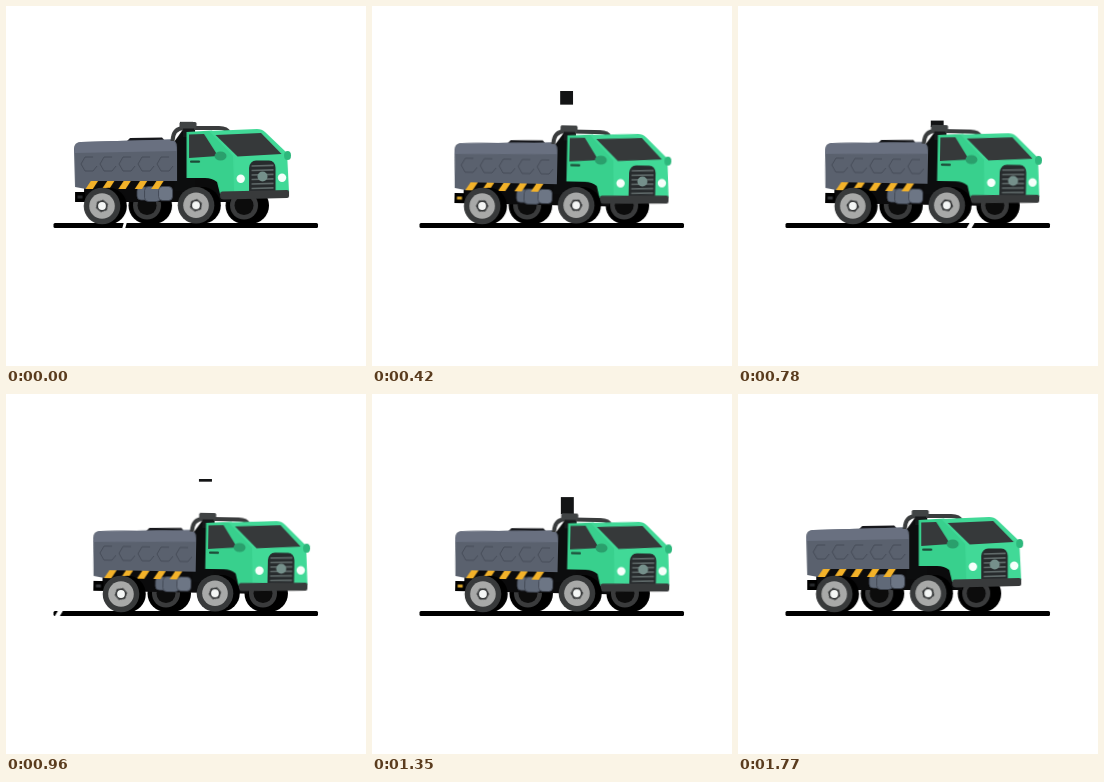
Animation, 360 px wide and 360 px high, one loop 1800 ms. Source, as an HTML page:

```html
<!DOCTYPE html>
<html lang="en">
<head>
<meta charset="utf-8">
<title>Tank truck</title>
<style>
  html, body { margin: 0; width: 100%; height: 100%; overflow: hidden; background: #fff; }
  svg { display: block; width: 100vw; height: 100vh; }

  .truck { animation: drive 900ms cubic-bezier(.31, .07, .25, 1) infinite alternate; }
  .body { transform-origin: 162px 160px; animation: pitch 900ms linear infinite alternate; }
  .hub { transform-box: fill-box; transform-origin: center; animation: spin 600ms linear infinite; }
  .puff { animation: rise calc(1800ms / 7) linear infinite; }
  .gap { animation: pass 1800ms linear infinite; }
  .gap.early { animation-name: leave; }
  .glint { animation: shine 1800ms linear infinite; }
  .lamp { animation: blink 1800ms step-end infinite; }

  @keyframes drive { to { transform: translateX(19px); } }
  @keyframes pitch {
    0%, 3.3% { transform: none; }
    16.7% { transform: translateY(6.5px) rotate(.33deg); }
    26.7% { transform: translateY(6px) rotate(.65deg); }
    46.7% { transform: translateY(3px) rotate(1.25deg); }
    100% { transform: translateY(2.5px) rotate(1deg); }
  }
  @keyframes spin { to { transform: rotate(360deg); } }
  @keyframes rise {
    0% { transform: translateY(116px); }
    6.6% { transform: translateY(113.5px); }
    43.6% { transform: translateY(93px); }
    58.3% { transform: translateY(86px); }
    63.4% { transform: translateY(82px); }
    78%, 100% { transform: translateY(66px); }
  }
  @keyframes pass {
    0% { transform: translateX(320px); }
    17.8%, 100% { transform: translateX(0); }
  }
  @keyframes leave {
    0% { transform: translateX(119px); }
    6.6%, 100% { transform: translateX(0); }
  }
  @keyframes shine {
    0%, 60% { transform: translateX(-30px); }
    63.3% { transform: none; }
    71%, 100% { transform: translateX(75px); }
  }
  @keyframes blink {
    0% { fill: #26282b; }
    5% { fill: #e0402c; }
    17% { fill: #d9a52a; }
    33% { fill: #34363a; }
    60% { fill: #6b4a22; }
    72% { fill: #d9a52a; }
    93% { fill: #26282b; }
  }
</style>
</head>
<body>
<svg viewBox="0 0 360 360">
  <defs>
    <clipPath id="air"><rect x="160" y="85.500" width="50" height="35"/></clipPath>
    <clipPath id="glass"><path d="M209.500 129L255 127L275.500 148L231.500 150.500Z"/></clipPath>
    <g id="far">
      <circle cx="6.500" r="18.500"/>
      <circle r="18.500"/>
      <circle r="14" fill="#3a3b3c"/>
      <circle r="9.500" fill="#0c0c0c"/>
    </g>
    <g id="near">
      <circle cx="6.500" r="18.300"/>
      <circle r="18.300" fill="#383a3b"/>
      <circle r="12.800" fill="#a8a9a8"/>
      <path class="hub" d="M-6.500 0L-3.200 -5.600H3.200L6.500 0L3.200 5.600H-3.200Z" fill="#383a3b"/>
      <circle r="3.900" fill="#f4f6f5"/>
    </g>
    <path id="stripe" d="M79.500 183L84.800 175H92L86.800 183Z" fill="#f3b229"/>
    <path id="plate" d="M4 -7H-4L-8 0L-4 7H4L8 2" fill="none" stroke="#474d59"/>
    <path id="bar" d="M245.500 0L267.500 -.6" stroke="#5f6969" stroke-width="1.600"/>
  </defs>

  <rect x="47.500" y="217" width="264.500" height="5" rx="1.500"/>
  <g fill="#fff">
    <path class="gap early" d="M-2 223L0 216H3L1 223Z"/>
    <path class="gap" style="animation-delay:-1107ms" d="M-4 223L0 216H5L1 223Z"/>
    <path class="gap" style="animation-delay:-745ms" d="M-11 223L-7 216H10L7 223Z"/>
  </g>

  <g class="truck">
    <g clip-path="url(#air)"><rect class="puff" x="174" width="13" height="17" fill="#131415"/></g>

    <use href="#far" x="141" y="199.500"/>
    <use href="#far" x="238" y="199.500"/>

    <g class="body">
      <!-- chassis and wheel arch -->
      <path d="M78 174H181V171H206L224 180V196H78Z" fill="#0b0b0c"/>
      <rect x="69" y="186" width="10" height="10"/>
      <rect class="lamp" x="71.500" y="189.500" width="5" height="3"/>
      <g fill="#606978" stroke="#3d434e" stroke-width=".8">
        <rect x="131" y="181" width="13" height="13" rx="4"/>
        <rect x="138.500" y="180.500" width="16" height="15" rx="4"/>
        <rect x="152.500" y="180.500" width="14" height="14" rx="4" fill="#6d7685"/>
      </g>

      <!-- tank -->
      <path d="M120 136L124 132L156 131.500L159 135Z" fill="#17181c"/>
      <path d="M168 136L178 122H189V185H168Z" fill="#0c0d0e"/>
      <path d="M68 143Q68 136 75 136L165 133.500Q171 134 171 141V175L90 175L80 183L69 181Z" fill="#5a616e"/>
      <path d="M68 147Q68 136 75 136L165 133.500Q170 134 170.500 145Z" fill="#697080"/>
      <use href="#plate" x="83" y="158"/>
      <use href="#plate" x="102" y="158"/>
      <use href="#plate" x="121" y="158"/>
      <use href="#plate" x="140" y="158"/>
      <use href="#plate" x="159" y="158"/>
      <use href="#stripe"/>
      <use href="#stripe" x="16.400"/>
      <use href="#stripe" x="32.800"/>
      <use href="#stripe" x="49.200"/>
      <use href="#stripe" x="65.600"/>

      <!-- exhaust -->
      <path d="M166.500 135Q167 122 178 122H213Q221 122 223 127" fill="none" stroke="#3a3c3d" stroke-width="4"/>
      <rect x="177" y="121" width="11" height="10" fill="#17181a"/>
      <rect x="173.500" y="116" width="17" height="6.500" rx="1.500" fill="#404344"/>

      <!-- cab -->
      <path d="M180.500 126L206 124.500L231 150V188H214L211 176Q206 172 199 172H180.500Z" fill="#38d08d"/>
      <path d="M203 125L251 123Q256 123 259 126L281 147L283 186L228 188L227 150Z" fill="#41d997"/>
      <path d="M183 128.500L198 128L212 150L183 152Z" fill="#36393a"/>
      <path d="M209.500 129L255 127L275.500 148L231.500 150.500Z" fill="#36393a"/>
      <g clip-path="url(#glass)"><path class="glint" d="M204 126H223.500L232 151H212Z" fill="#fff"/></g>
      <rect x="184" y="154.500" width="10" height="2.200" rx="1" fill="#1d4b38"/>
      <ellipse cx="214.500" cy="150" rx="6" ry="4.500" fill="#2a9f6c"/>
      <ellipse cx="281.500" cy="149.500" rx="3.500" ry="4.500" fill="#2db87c"/>

      <!-- front -->
      <path d="M243 187V162Q244 154.500 250 154.500H263Q269 154.500 269.500 162V186Z" fill="#272b2d"/>
      <use href="#bar" y="160"/>
      <use href="#bar" y="164.500"/>
      <use href="#bar" y="169"/>
      <use href="#bar" y="173.500"/>
      <use href="#bar" y="178"/>
      <use href="#bar" y="182.500"/>
      <circle cx="256.500" cy="170.500" r="5" fill="#75908b"/>
      <circle cx="234.700" cy="172.700" r="4.200" fill="#f7fffb"/>
      <circle cx="276" cy="171.700" r="4.200" fill="#f7fffb"/>
      <path d="M216 185.500L281 184Q283 184 283 186V190Q283 192 281 192L218 193.500Q214 193.500 214 190V188Q214 185.500 216 185.500Z" fill="#383a3b"/>
    </g>

    <use href="#near" x="96" y="200"/>
    <use href="#near" x="190" y="199.300"/>
  </g>
</svg>
</body>
</html>
```
